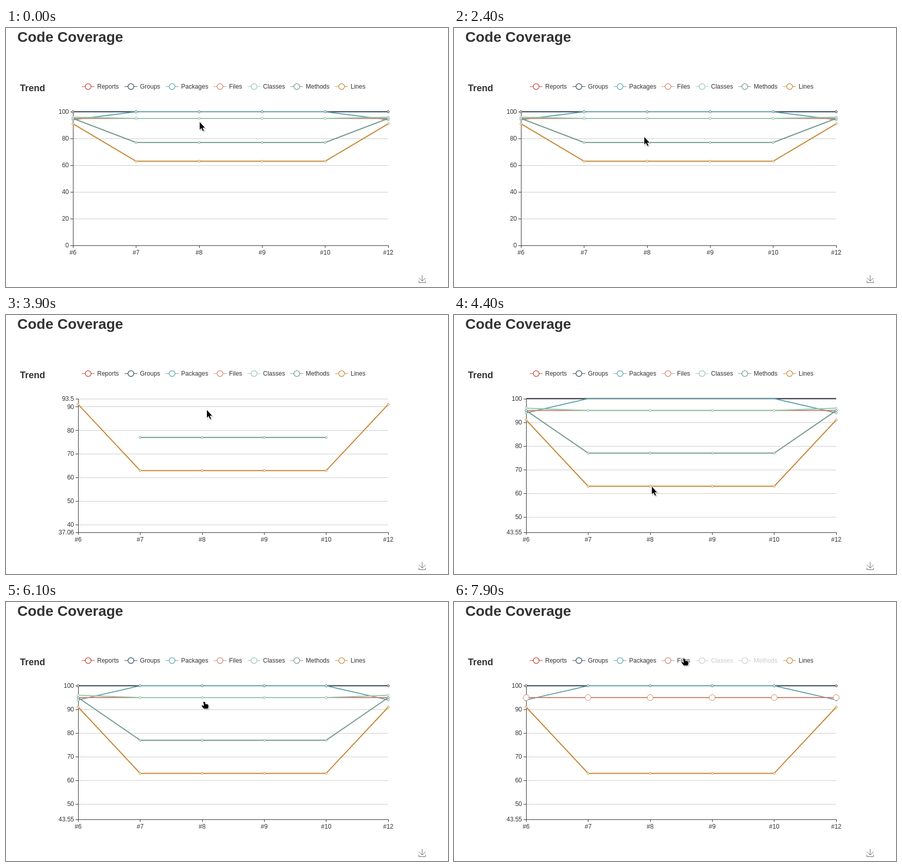
Recreate the animation shown at these times as an HTML page. Size 858 px wide and 504 px high, loop 8000 ms.

```html
<!DOCTYPE html>
<html lang="en">
<head>
<meta charset="utf-8">
<title>Code Coverage</title>
<style>
html, body { margin: 0; width: 100%; height: 100%; overflow: hidden; background: #fff; }
body { position: relative; }
svg { position: absolute; left: 0; top: 0; display: block; }
svg, #tip { font-family: "Liberation Sans", Arial, sans-serif; }
text { fill: #333; font-size: 12px; }
#tip {
  position: absolute; padding: 5px; border-radius: 4px; white-space: nowrap;
  background: rgba(50, 50, 50, .7); color: #fff; font-size: 14px; line-height: 21px;
}
</style>
</head>
<body>
<svg width="858" height="504" viewBox="0 0 858 504">
  <defs><clipPath id="plot"><rect x="100" y="161" width="660" height="264"/></clipPath></defs>
  <text x="22" y="27" style="font-size:28px;font-weight:bold">Code Coverage</text>
  <text x="27" y="123" style="font-size:18px;font-weight:bold">Trend</text>
  <path d="M801.5 486.4L807.9 492.3L814.5 486.5M801.5 491.8V495.5H814.2V491.8M807.9 492.2V480.5" fill="none" stroke="#666"/>
  <g id="legend"></g>
  <g id="chart"></g>
</svg>
<div id="tip"></div>
<svg width="858" height="504" viewBox="0 0 858 504">
  <g id="cursor">
    <path id="shade" fill="#000" opacity=".2" transform="translate(1.5 1.5)" stroke="#000" stroke-width="1.6"/>
    <path id="shape" fill="#000" stroke="#fff" stroke-width="1.6" stroke-linejoin="round" paint-order="stroke"/>
  </g>
</svg>
<script>
const LOOP = 8000, STEP = 100, TOP = 163, BOTTOM = 423, RIGHT = 742, MORPH = 300;
const $ = id => document.getElementById(id);
const mix = (a, b, p) => a + (b - a) * p;
const clamp = p => Math.min(1, Math.max(0, p));
const out = (p, power = 2) => 1 - (1 - clamp(p)) ** power;
const crisp = v => Math.floor(v + .25) + .5;
const yOf = (map, v) => map[0] * v + map[1];
const xOf = (map, i) => mix(map[2], RIGHT, i / 5);

// outer value for the first and last build, inner value for the rest
const row = (name, color, outer, inner) =>
  ({ name, color, off: LOOP, data: [outer, inner, inner, inner, inner, outer] });
const series = [
  row('Reports', '#bf3c35', 100, 100), row('Groups', '#2f4554', 100, 100),
  row('Packages', '#61a0a8', 94, 100), row('Files', '#d08268', 95, 95),
  row('Classes', '#91c7ae', 96, 95), row('Methods', '#73998a', 95, 77),
  row('Lines', '#c5852f', 91, 63)
];
const builds = ['#6', '#7', '#8', '#9', '#10', '#12'];
const named = name => series.find(s => s.name === name);

// legend items flow from the left by text width
const pen = document.createElement('canvas').getContext('2d');
pen.font = '12px "Liberation Sans", Arial, sans-serif';
let flow = 147;
for (const s of series) {
  s.x = flow + 30;
  flow = s.x + Math.ceil(pen.measureText(s.name).width) + 10;
}

// wheel zoom around a fixed height, then a drag up to 100
const ranges = [];
function addRange(at, hi, span) {
  const k = (TOP - BOTTOM) / span;
  ranges.push({ at, lo: hi - span, hi, map: [k, TOP - k * hi, span < 100 ? 140 : 130] });
}
const zoomed = i => 100 / 1.1 ** i;
for (let i = 0; i <= 6; i++)
  addRange(i ? 2882 + 110 * i : -MORPH, 100 - .1573 * (100 - zoomed(i)), zoomed(i));
for (let i = 0; i <= 3; i++) addRange(3790 + 115 * i, mix(93.504, 100, i / 3), zoomed(6));

function layout(t) {
  const n = ranges.filter(r => r.at <= t).length - 1;
  let map = ranges[0].map;
  for (let i = 1; i <= n; i++) {
    const end = i < n ? ranges[i + 1].at : t;
    const p = out((end - ranges[i].at) / MORPH);
    map = map.map((v, j) => mix(v, ranges[i].map[j], p));
  }
  return { n, map };
}

// pointer stops: resting, over a point of #8, or over a legend item clicked on leaving
const rest = (from, to, x, y) => ({ from, to, x, y });
function point(from, to, name) {
  const { map } = layout(from), value = named(name).data[2];
  return { from, to, name, value, x: xOf(map, 2) + 1, y: yOf(map, value) - 1 };
}
function item(from, to, name) {
  const s = named(name);
  s.off = to;
  return { from, to, name, all: true, x: s.x + 14, y: 110 };
}
const stops = [
  rest(0, 400, 376, 183), point(550, 1000, 'Classes'), point(1385, 1900, 'Methods'),
  rest(2900, 3400, 363, 202), rest(3700, 3900, 390, 185), rest(4400, 4400, 384, 334),
  point(5200, 5650, 'Packages'), point(5850, 5950, 'Classes'), rest(6100, 6100, 385, 194),
  item(6700, 7000, 'Methods'), item(7300, 7500, 'Classes'), item(7650, LOOP, 'Files')
];
const tips = stops.filter(s => s.value);
const over = (t, linger) => s => s.name && t >= s.from && t <= s.to + linger;

const line = (x1, y1, x2, y2, color = '#333') =>
  `<path d="M${x1} ${y1}L${x2} ${y2}" stroke="${color}"/>`;
const label = (x, y, s, anchor, color = '#333') =>
  `<text x="${x}" y="${y}" text-anchor="${anchor}" style="fill:${color}">${s}</text>`;
const ring = (x, y, r, color, width = 1) =>
  `<circle cx="${x}" cy="${y}" r="${r}" fill="#fff" stroke="${color}" stroke-width="${width}"/>`;

function axes({ lo, hi, map: goal }, map) {
  const step = hi - lo > 75 ? 20 : 10, left = map[2];
  let s = '';
  const tick = (v, x, y) => {
    s += line(left, crisp(y), RIGHT, crisp(y), '#ccc') + line(x - 5, crisp(y), x, crisp(y)) +
      label(x - 8, y + 4, +v.toFixed(2), 'end');
  };
  tick(lo, goal[2], BOTTOM);
  for (let v = Math.ceil(lo / step) * step; v < hi; v += step)
    if (v > lo) tick(v, left, Math.min(BOTTOM, Math.max(TOP, yOf(map, v))));
  tick(hi, goal[2], TOP);
  s += line(crisp(left), TOP, crisp(left), BOTTOM + 1) + line(left, BOTTOM + .5, RIGHT + 1, BOTTOM + .5);
  builds.forEach((b, i) => {
    const x = xOf(map, i);
    s += line(crisp(x), BOTTOM, crisp(x), BOTTOM + 5) + label(x, 441, b, 'middle');
  });
  return s;
}

// values above the range are dropped, their dots shrink away
function plot(t, n, map) {
  const now = ranges[n], old = ranges[n - 1], hover = stops.find(over(t, 100));
  let lines = '', dots = '';
  for (const { name, color, data, off } of series) {
    if (t >= off) continue;
    const pts = [];
    data.forEach((v, i) => {
      const x = xOf(map, i), y = yOf(map, v);
      if (v <= now.hi) {
        pts.push(`${x},${y}`);
        const big = hover && hover.name === name && (hover.all || i === 2);
        const grow = v === 100 && n ? out((t - 4700) / MORPH) : 1;
        if (grow) dots += ring(x, y, big ? 5.7 : 2 * grow, color);
      } else if (old && v <= old.hi) {
        const r = 2 * (1 - out((t - now.at) / MORPH));
        dots += `<circle cx="${xOf(old.map, i)}" cy="${yOf(old.map, v)}" r="${r}" fill="${color}"/>`;
      }
    });
    lines += `<polyline points="${pts.join(' ')}" fill="none" stroke="${color}" stroke-width="2" stroke-linejoin="bevel"/>`;
  }
  return `<g clip-path="url(#plot)">${lines}</g>${dots}`;
}

function legend(t) {
  return series.map(({ name, color, x, off }) => {
    const on = t < off, c = on ? color : '#ccc';
    return line(x - 30, 114, x - 5, 114, c) + ring(x - 17.5, 114, 5.6, c, 1.2) +
      label(x, 118, name, 'start', on ? '#333' : '#ccc');
  }).join('');
}

// the tooltip glides in from where it was last shown
function showTip(t) {
  const i = tips.findIndex(over(t, 100)), el = $('tip');
  el.style.display = i < 0 ? 'none' : 'block';
  if (i < 0) return;
  const tip = tips[i], prev = tips[i - 1] || tip, p = out((t - tip.from) / 400, 3);
  el.innerHTML = `<b>#8</b><br>${tip.name}: ${tip.value}%`;
  el.style.left = Math.round(mix(prev.x, tip.x, p) + 20) + 'px';
  el.style.top = Math.round(mix(prev.y, tip.y, p) + 22) + 'px';
}

const ARROW = 'M0 0V14.8L3.3 11.7L6 17.6L8.1 16.7L5.5 11H10Z';
const HAND = 'M-2 1Q-.5-1 1 1L2.6 5L5 4.6L7.5 6L8 10L6.5 13.5H-1L-5 8.5Q-5 6.8-3.4 7.2L-.6 8.2Z';

function moveCursor(t) {
  const i = stops.findIndex(s => s.to > t), b = stops[i], a = stops[i - 1] || b;
  const p = clamp((t - a.to) / (b.from - a.to || 1));
  $('cursor').setAttribute('transform', `translate(${mix(a.x, b.x, p)} ${mix(a.y, b.y, p)})`);
  const d = stops.some(over(t, 150)) ? HAND : ARROW;
  $('shape').setAttribute('d', d);
  $('shade').setAttribute('d', d);
}

function draw(t) {
  const { n, map } = layout(t);
  $('chart').innerHTML = axes(ranges[n], map) + plot(t, n, map);
  $('legend').innerHTML = legend(t);
  showTip(t);
  moveCursor(t);
}

let last = -1;
function frame() {
  const t = Math.floor(performance.now() % LOOP / STEP) * STEP;
  if (t !== last) draw(last = t);
  requestAnimationFrame(frame);
}
frame();
</script>
</body>
</html>
```
